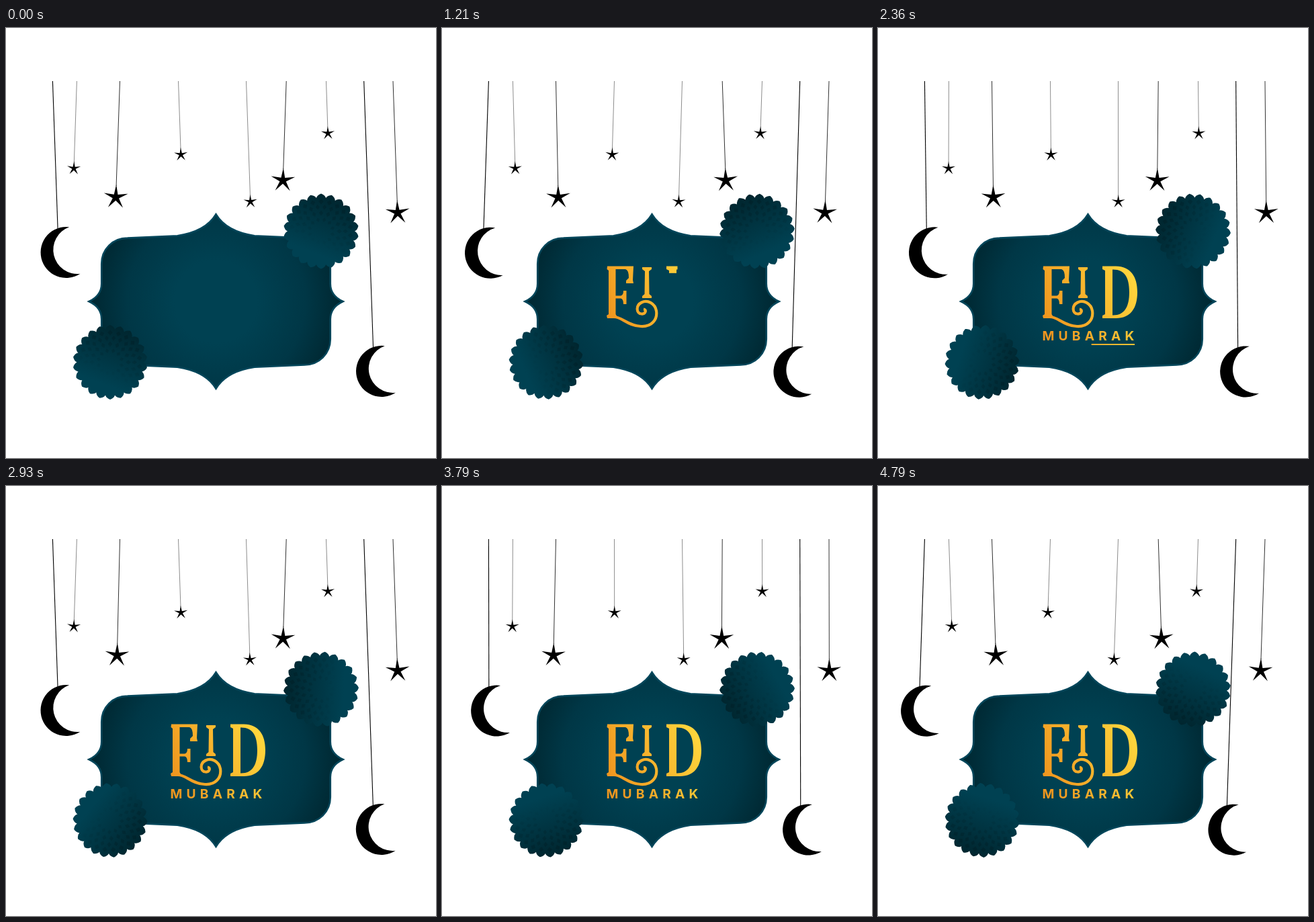
These frames come from a looping animation (640 by 640 pixels, 4870 ms). An HTML page:

```html
<!DOCTYPE html>
<html lang="en">
<head>
<meta charset="utf-8">
<title>Eid Mubarak</title>
<style>
  html, body { margin: 0; width: 100%; height: 100%; overflow: hidden; background: #fff; }
  svg { display: block; width: 100vw; height: 100vh; }
  .greeting { font: 700 19.2px Inter, "Open Sans", sans-serif; letter-spacing: 6.2px; }
  mask path { fill: none; stroke: #fff; }
</style>
</head>
<body>
<svg viewBox="0 0 640 640">
  <defs>
    <radialGradient id="plate" gradientUnits="userSpaceOnUse" cx="0" cy="0" r="207">
      <stop offset=".3" stop-color="#004152"/>
      <stop offset=".65" stop-color="#003746"/>
      <stop offset="1" stop-color="#00222a"/>
    </radialGradient>
    <linearGradient id="bloom" gradientUnits="userSpaceOnUse" x1="20" y1="-50" x2="-12" y2="32">
      <stop offset="0" stop-color="#00262f"/>
      <stop offset=".45" stop-color="#003340"/>
      <stop offset="1" stop-color="#004152"/>
    </linearGradient>
    <linearGradient id="speck" gradientUnits="userSpaceOnUse" x1="18" y1="-46" x2="-10" y2="20">
      <stop offset="0" stop-color="#001c23" stop-opacity=".45"/>
      <stop offset="1" stop-color="#001c23" stop-opacity="0"/>
    </linearGradient>
    <linearGradient id="gold" gradientUnits="userSpaceOnUse" x1="246" y1="425" x2="376" y2="365">
      <stop offset="0" stop-color="#f0961f"/>
      <stop offset="1" stop-color="#ffd53c"/>
    </linearGradient>
    <mask id="pen" maskUnits="userSpaceOnUse" x="0" y="0" width="640" height="640"></mask>
    <clipPath id="wipe"><rect id="wipeBox" x="240" y="445" height="24"/></clipPath>
  </defs>

  <g transform="translate(312.5 407)">
    <path transform="scale(.99 .983)" fill="url(#plate)" stroke="#03465a" stroke-width="2.6"
      d="M0-132C12-112 34-103 58-99.5L133-96C155-96 172-79 172-57V-27C172-14 180-5 191 0
         C180 5 172 14 172 27V57C172 79 155 96 133 96L58 99.5C34 103 12 112 0 132
         C-12 112-34 103-58 99.5L-133 96C-155 96-172 79-172 57V27C-172 14-180 5-191 0
         C-180-5-172-14-172-27V-57C-172-79-155-96-133-96L-58-99.5C-34-103-12-112 0-132Z"/>
  </g>
  <g id="blooms"></g>

  <g mask="url(#pen)" fill="url(#gold)">
    <path d="M246 354.5H285L284 375L285 380H274V376L278 372Q278 360 273 359H258.5V398.5H266Q270 398 270 391
             H274.5V411H270Q270 403 266 402.5H258.5V426L262 432H246L245 428L248 426V361L245.5 359Z"/>
    <path id="swash" fill="none" stroke="url(#gold)" stroke-width="4.2" stroke-linecap="round"
      d="M256 430C268 430 276 443 296 444C312 445 321 434 319 421C317 410 306 404 297 408.5
         C288 413 289 425 297 425.5C303 426 305 419 300 418.5"/>
    <path d="M298 356H312V359L308 362L308.5 396L312 399V402H298V399L301.5 396L302 362L298 359Z"/>
    <path fill-rule="evenodd" d="M334 354.5H354C376 355 386 370 386 393C386 417 376 432 354 432H334V428L338 426
             V361L334 359ZM349 359.5V427.5C367 428 374 415 374 393C374 371 367 359 349 359.5Z"/>
  </g>
  <text class="greeting" x="244.5" y="465.4" fill="url(#gold)" clip-path="url(#wipe)">MUBARAK</text>
  <rect id="rule" y="470" height="2" fill="url(#gold)"/>
  <g id="hangers"></g>
</svg>
<script>
const LOOP = 4870, TICKS = 68, SWING = 2;
const $ = id => document.getElementById(id);

function add(parent, tag, attrs) {
  const el = document.createElementNS('http://www.w3.org/2000/svg', tag);
  for (const k in attrs) el.setAttribute(k, attrs[k]);
  return parent.appendChild(el);
}
const clamp = v => Math.min(1, Math.max(0, v));
const part = (t, from, to) => clamp((t - from) / (to - from));
const polar = (r, a) => (r * Math.sin(a)).toFixed(2) + ' ' + (-r * Math.cos(a)).toFixed(2);

// Hanging stars and moons
function star(y, r) {
  let d = '';
  for (let i = 0; i < 10; i++) d += (i ? 'L' : 'M') + polar(i % 2 ? r * 0.26 : r, i * Math.PI / 5);
  return { d: d + 'Z', transform: `translate(0 ${y})` };
}
const moon = y => ({
  d: 'M18 0A38 38 0 1 0 31.8 70A35.9 35.9 0 0 1 18 0Z',
  transform: `translate(-.8 ${y})`
});

// x, drop, kind, first side (1 = right), turning times in seconds
const hangers = [
  [69.4, 218, 'moon', 1, [0, 1.32, 3, 4.65]],
  [105.4, 130, 'small', -1, [-.15, 1.6, 3.05, 4.7]],
  [169.5, 173, 'big', -1, [-.05, 1.75, 3.35, 4.85]],
  [256.5, 109.5, 'small', 1, [-.05, 1.48, 3, 4.65]],
  [357.5, 179.5, 'small', 1, [0, 1.5, 3.2, 4.75]],
  [417.2, 148, 'big', -1, [-.1, 1.2, 3.15, 4.6]],
  [476.5, 77.8, 'small', 1, [-.1, 1.3, 3.05, 4.6]],
  [532.7, 395, 'moon', 1, [0, 1.5, 3.02, 4.65]],
  [576, 196, 'big', 1, [-.05, 1.45, 3, 4.65]]
].map(([x, drop, kind, side, turns]) => {
  const g = add($('hangers'), 'g', {});
  const r = kind === 'big' ? 18.8 : 10.6;
  const isMoon = kind === 'moon';
  const width = { moon: 1.1, big: .8, small: .45 }[kind];
  add(g, 'path', { d: `M0 0V${isMoon ? drop + 3 : drop - r + 2}`, stroke: '#000', 'stroke-width': width });
  add(g, 'path', isMoon ? moon(drop) : star(drop, r));
  return { g, x, side, turns };
});

function swing({ side, turns }, t) {
  let i = 0;
  while (i < 2 && t > turns[i + 1]) i++;
  const u = (t - turns[i]) / (turns[i + 1] - turns[i]);
  return side * SWING * Math.cos(Math.PI * (i + u));
}

// Rotating flowers
function petals(n, tip, notch) {
  const s = 2 * Math.PI / n, bend = (tip + notch) / 2 + 1.2;
  let d = 'M' + polar(notch, -s / 2);
  for (let i = 0; i < n; i++) {
    const a = i * s;
    d += `Q${polar(bend, a - s * .38)} ${polar(tip, a)}Q${polar(bend, a + s * .38)} ${polar(notch, a + s / 2)}`;
  }
  return d + 'Z';
}
function specks(n, r, len, shift) {
  const s = 2 * Math.PI / n;
  let d = '';
  for (let i = 0; i < n; i++) {
    const a = (i + shift) * s;
    d += `M${polar(r, a)}L${polar(r + len * .55, a + s * .3)}L${polar(r + len, a)}L${polar(r + len * .55, a - s * .3)}Z`;
  }
  return d;
}
const blooms = [[469, 302.5, 56, -1], [155, 497.5, 55.5, 1]].map(([x, y, r, dir]) => {
  const g = add($('blooms'), 'g', {});
  add(g, 'path', { d: petals(22, r, r - 6), fill: 'url(#bloom)' });
  let d = '';
  [[22, 40, 8], [22, 32, 8], [16, 23, 8], [12, 14, 7]].forEach(([n, at, len], i) => d += specks(n, at, len, i % 2 / 2));
  add(g, 'path', { d, fill: 'url(#speck)' });
  return { g, x, y, dir };
});

// Pen strokes that uncover the lettering: path, width, start, end
const strokes = [
  ['M280 382V357H244', 14, .07, .35],
  ['M252 350V434', 16, .25, .52],
  ['M259 401H277', 24, .45, .62],
  [$('swash').getAttribute('d').replace('M256', 'M244 430H256 '), 9, .49, 1],
  ['M305 354V404', 18, .85, 1.15],
  ['M342 352V434', 17, 1.18, 1.42],
  ['M342 357H355C388 357 388 430 355 430H334', 24, 1.4, 1.68]
].map(([d, width, from, to]) => ({
  el: add($('pen'), 'path', {
    d: d.replace('H256  430C', 'H256C'),
    'stroke-width': width, pathLength: 1, 'stroke-dasharray': '1 1.1'
  }),
  from, to
}));

function draw(now) {
  const tick = Math.min(TICKS - 1, Math.floor(now % LOOP / LOOP * TICKS + .17));
  const t = tick * LOOP / TICKS / 1000;
  for (const h of hangers) h.g.setAttribute('transform', `translate(${h.x} 79) rotate(${-swing(h, t)})`);
  for (const b of blooms) b.g.setAttribute('transform', `translate(${b.x} ${b.y}) rotate(${b.dir * t * 37})`);
  for (const s of strokes) s.el.setAttribute('stroke-dashoffset', 1 - part(t, s.from, s.to));
  $('wipeBox').setAttribute('width', 150 * part(t, 1.48, 2.09));
  const head = 136 * part(t, 1.65, 2.23), tail = 136 * part(t, 2.1, 2.6);
  $('rule').setAttribute('x', 246 + tail);
  $('rule').setAttribute('width', head - tail);
  requestAnimationFrame(() => draw(performance.now()));
}
draw(0);
</script>
</body>
</html>
```
